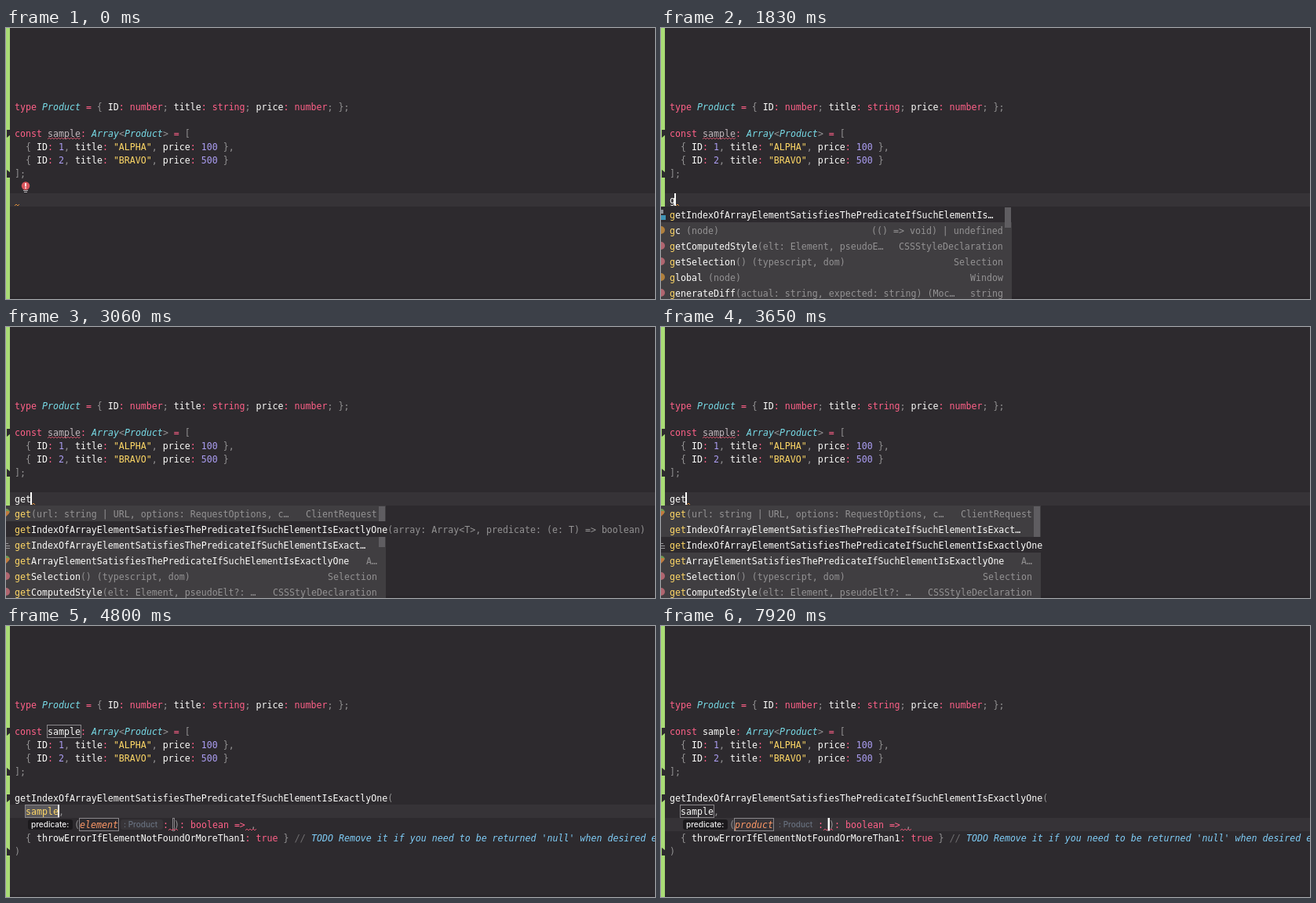
Recreate the animation shown at these times as an HTML page. Size 827 px wide and 346 px high, loop 7.99 s.

```html
<!DOCTYPE html>
<html lang="en">
<head>
<meta charset="utf-8">
<title>Code completion</title>
<style>
html, body { margin: 0; width: 100%; height: 100%; overflow: hidden; background: #2d2a2e; }
#stage { position: absolute; left: 0; top: 0; width: 827px; height: 346px; overflow: hidden; background: #2d2a2e; }
#stage div { position: absolute; }
#stage svg { position: absolute; left: 0; top: 0; }
.layer { left: 0; top: 0; width: 827px; height: 346px; }
.code {
  margin-top: 1px;
  font: 11.627px/17px "DejaVu Sans Mono", "Noto Sans Mono", monospace;
  font-variant-ligatures: none; white-space: pre; color: #fcfcfa;
}
.row { line-height: 20px; }
.hint { font: 500 10px/13px Inter, Roboto, sans-serif; white-space: pre; border-radius: 3px; height: 13px; box-sizing: border-box; }
.k { color: #ff6188; }
.i { color: #78dce8; font-style: italic; }
.g { color: #939293; }
.n { color: #ab9df2; }
.s { color: #ffd866; }
.o { color: #fc9867; font-style: italic; }
.u { color: #c1b8bd; }
.c { color: #727072; font-style: italic; }
.d { color: #7fcdf7; font-style: italic; }
</style>
</head>
<body>
<div id="stage"></div>
<script>
const LOOP = 7990, CELL = 7, LEFT = 11, END = LOOP;
const stage = document.getElementById('stage');
const layers = [];
let layer;

const lineTop = n => 92 + 17 * n;

function add(parent, cls, style) {
  const el = document.createElement('div');
  el.className = cls;
  Object.assign(el.style, style);
  return parent.appendChild(el);
}

// Everything drawn inside is visible from `from` until `to`
function during(from, to, draw) {
  layer = add(stage, 'layer', {});
  layers.push({ el: layer, from, to });
  draw();
}

const px = v => v + 'px';
const rect = (x, y, w, h, background) =>
  add(layer, '', { left: px(x), top: px(y), width: px(w), height: px(h), background });

// Each part is a one-letter colour class, a colon and its text
function text(x, y, parts, cls = 'code') {
  const el = add(layer, cls, { left: px(x), top: px(y) });
  for (const part of parts) {
    const span = document.createElement('span');
    span.className = part[0];
    span.textContent = part.slice(2);
    el.append(span);
  }
  return el;
}
const line = (n, x, ...parts) => text(x, lineTop(n), parts);

function svg(markup) {
  layer.insertAdjacentHTML('beforeend', `<svg width="827" height="346">${markup}</svg>`);
}

function wave(x, end, y, color) {
  let d = `M${x} ${y + 2}`;
  for (let p = x + 2, up = true; p <= end; p += 2, up = !up) d += `L${p} ${up ? y : y + 2}`;
  svg(`<path d="${d}" fill="none" stroke="${color}"/>`);
}

// Outline around a stretch of one code line
const frame = (n, x, w) =>
  svg(`<rect x="${x - .5}" y="${lineTop(n) + .5}" width="${w + 1}" height="16" fill="none" stroke="#8a878b"/>`);

const caret = (x, n) => rect(x - 1, lineTop(n), 2, 16, '#fcfcfa');
const caretRow = n => rect(5, lineTop(n), 822, 17, '#363337');

function fold(n, closing) {
  const y = lineTop(n) + 4;
  const d = closing ? `M1 ${y + 10}H6V${y + 4}L1 ${y}Z` : `M1 ${y}H6V${y + 6}L1 ${y + 10}Z`;
  svg(`<path d="${d}" fill="#2d2a2e"/>`);
}

// Caret row behind the code
during(0, 4080, () => caretRow(7));
during(4080, 5270, () => caretRow(8));
during(5270, END, () => caretRow(9));

during(0, END, () => {
  rect(5, 343, 822, 3, '#29262a');
  rect(0, 0, 5, 346, '#a9dc76');
  fold(2);
  fold(5, true);
  line(0, LEFT, 'k:type ', 'i:Product', 'k: = ', 'g:{ ', 'w:ID', 'k:: number', 'g:; ', 'w:title',
    'k:: string', 'g:; ', 'w:price', 'k:: number', 'g:; };');
  line(2, LEFT, 'k:const');
  line(2, 95, 'k:: ', 'i:Array', 'g:<', 'i:Product', 'g:>', 'k: = ', 'g:[');
  const entry = (n, id, title, price, end) => line(n, 25, 'g:{ ', 'w:ID', 'k:: ', 'n:' + id, 'g:, ',
    'w:title', 'k:: ', `s:"${title}"`, 'g:, ', 'w:price', 'k:: ', 'n:' + price, 'g: }' + end);
  entry(3, 1, 'ALPHA', 100, ',');
  entry(4, 2, 'BRAVO', 500, '');
  line(5, LEFT, 'g:];');
});

during(0, 4430, () => line(2, 53, 'u:sample'));
during(4430, END, () => line(2, 53, 'w:sample'));
during(0, 4800, () => wave(53, 95, 140, '#c75268'));
during(4150, 5270, () => frame(2, 53, 42));

// Typing the prefix
during(0, 1120, () => svg(`
  <circle cx="25" cy="201.5" r="5.2" fill="#d9555c"/>
  <path d="M25 198v4.5M25 203.500v1.500" stroke="#fff" stroke-width="1.600"/>
  <path d="M22 207.500h6M23 209.500h4" stroke="#b5b3b6"/>`));
const prefix = (from, to, word) => during(from, to, () => {
  const x = LEFT + CELL * word.length;
  line(7, LEFT, 'w:' + word);
  wave(word ? x + 1 : x, x + 6, 225, '#d98b3a');
});
prefix(0, 1730, '');
prefix(1730, 1900, 'g');
prefix(1900, 2120, 'ge');
prefix(2120, 4080, 'get');
[[1120, 1730, 0], [1730, 1900, 1], [1900, 2120, 2], [2120, 3140, 3], [3650, 4080, 3]]
  .forEach(([from, to, col]) => during(from, to, () => caret(LEFT + CELL * col, 7)));

// Completion popup
const rowTop = i => 228 + 20 * i;
const dots = { v: '#b07f3c', f: '#b0656f' };

function icon(kind, i) {
  const y = rowTop(i) + 10;
  if (dots[kind]) svg(`<circle cx="0" cy="${y}" r="5" fill="${dots[kind]}"/>`);
  if (kind === 'm') svg(`<path d="M0 ${y - 6}a5 5 0 0 1 5 5H0z" fill="#6f9c54"/><path d="M0 ${y - 3}h4v3l-4 4z" fill="#c07a3c"/>`);
  if (kind === 'l') svg(`<path d="M0 ${y - 1.5}h3M0 ${y + 1.5}h5M0 ${y + 4.5}h5" stroke="#9a989b"/>`);
  if (kind === 't') svg(`<path d="M0 ${y - 6}h3v5H0z" fill="#8d9298"/><path d="M0 ${y + 1}h6v6H0z" fill="#3f93b5"/>`);
}

function item(i, typed, [kind, name, tail = '']) {
  icon(kind, i);
  text(LEFT, rowTop(i), ['s:' + name.slice(0, typed), 'w:' + name.slice(typed), 'g:' + tail], 'code row');
}

function popup(width, typed, selected, thumb, rows) {
  rect(0, 228, width, 118, '#403e41');
  rect(0, rowTop(selected), width, 20, '#2d2a2e');
  rows.forEach((row, i) => {
    item(i, typed, row);
    const type = row[3];
    if (type) text(width - 11 - CELL * type.length, rowTop(i), ['g:' + type], 'code row');
  });
  rect(width - 9, 229, 8, thumb, '#5f5d61');
}

const base = 'getIndexOfArrayElementSatisfiesThePredicateIfSuchElementIs';
const full = base + 'ExactlyOne';
const firstRows = [
  ['t', base + '…'],
  ['v', 'gc', ' (node)', '(() => void) | undefined'],
  ['f', 'getComputedStyle', '(elt: Element, pseudoE…', 'CSSStyleDeclaration'],
  ['f', 'getSelection', '() (typescript, dom)', 'Selection'],
  ['v', 'global', ' (node)', 'Window'],
  ['f', 'generateDiff', '(actual: string, expected: string) (Moc…', 'string'],
];
const nextRows = [
  ['m', 'get', '(url: string | URL, options: RequestOptions, c…', 'ClientRequest'],
  ['', base + 'Exact…'],
  ['l', base + 'Exact…'],
  ['m', 'getArrayElementSatisfiesThePredicateIfSuchElementIsExactlyOne', '', 'A…'],
  ['f', 'getSelection', '() (typescript, dom)', 'Selection'],
  ['f', 'getComputedStyle', '(elt: Element, pseudoElt?: …', 'CSSStyleDeclaration'],
];
during(1830, 1970, () => popup(447, 1, 0, 26, firstRows));
during(1970, 2190, () => popup(484, 2, 0, 52, nextRows));
[[2190, 2990, 0], [2990, 3350, 1], [3350, 4080, 2]]
  .forEach(([from, to, row]) => during(from, to, () => popup(484, 3, row, 52, nextRows)));

// The selected entry spills over the popup edge
const spill = (from, to, i, end, row) => during(from, to, () => {
  rect(0, rowTop(i), end, 20, '#2d2a2e');
  item(i, 3, row);
});
spill(3060, 3350, 1, 821, ['', full, '(array: Array<T>, predicate: (e: T) => boolean)']);
spill(3420, 4080, 2, 487, ['l', full]);

// Inserted template
during(4080, END, () => {
  line(7, LEFT, 'w:' + full, 'g:(');
  line(10, 25, 'g:{ ', 'w:throwErrorIfElementNotFoundOrMoreThan1', 'k:: true', 'g: }');
  line(11, LEFT, 'g:)');
});
const note = "TODO Remove it if you need to be returned 'null' when desired element";
during(4080, 4430, () => line(10, 368, 'c:// ' + note));
during(4430, END, () => {
  line(10, 368, 'c:// ', 'd:' + note);
  fold(7);
  fold(11, true);
});
during(4080, 4150, () => line(8, 25, 'w:sample', 'g:,'));
during(4150, 5270, () => {
  rect(25, lineTop(8), 42, 17, '#5b595c');
  frame(8, 25, 42);
  line(8, 25, 's:sample', 'g:,');
  caret(67, 8);
});
during(5270, END, () => {
  frame(8, 25, 42);
  line(8, 25, 'w:sample', 'g:,');
});

function hint(x, w, label, background, color) {
  add(layer, 'hint', { left: px(x), top: '247px', width: px(w), paddingLeft: '4px', background, color })
    .textContent = label;
}

// `known` characters already carry the parameter colour
function predicate(name, { known = name.length, hints = true, at = '', boxed = true, waves = true } = {}) {
  const start = hints ? 94 : 32;
  const width = CELL * name.length;
  const nameEnd = start + width;
  const tail = nameEnd + (hints ? 57 : 0);
  if (at === 'select') rect(start, lineTop(9), width, 17, '#5b595c');
  if (hints) {
    hint(28, 57, 'predicate:', '#1b191c', '#f0eff0');
    hint(nameEnd + 3, 54, ': Product', '#383539', '#68717f');
  }
  line(9, start - CELL, 'g:(', 'o:' + name.slice(0, known), 's:' + name.slice(known));
  line(9, tail, 'k:: ', 'g:)', 'k:: boolean =>', 'g: ,');
  if (boxed) {
    frame(9, start, width);
    frame(9, tail + 13, 1);
  }
  if (waves) {
    wave(tail + 7, tail + 20, 259, '#d9506f');
    wave(tail + 105, tail + 119, 259, '#d9506f');
  }
  if (at === 'name' || at === 'select') caret(nameEnd, 9);
  if (at === 'type') caret(tail + 14, 9);
}

const typing = { known: 0, at: 'name' };
const rest = { known: 4, at: 'name' };
const scenes = [
  [4080, 'element', { hints: false, boxed: false, waves: false }],
  [4150, 'element', { hints: false, waves: false }],
  [4430, 'element', { hints: false }],
  [4570, 'element'],
  [5270, 'element', { at: 'select' }],
  [5750, 'p', typing],
  [5840, 'pr', typing],
  [5990, 'pro', typing],
  [6130, 'prod', typing],
  [6480, 'prod', rest],
  [6840, 'produ', rest],
  [7140, 'produc', rest],
  [7290, 'product', rest],
  [7540, 'product', { known: 4, at: 'type' }],
  [7920, 'product', { at: 'type' }],
];
scenes.forEach(([from, name, look], i) =>
  during(from, i + 1 < scenes.length ? scenes[i + 1][0] : END, () => predicate(name, look)));

const start = performance.now();
function tick() {
  const t = (performance.now() - start) % LOOP;
  for (const { el, from, to } of layers) el.style.display = t >= from && t < to ? '' : 'none';
  requestAnimationFrame(tick);
}
tick();
</script>
</body>
</html>
```
